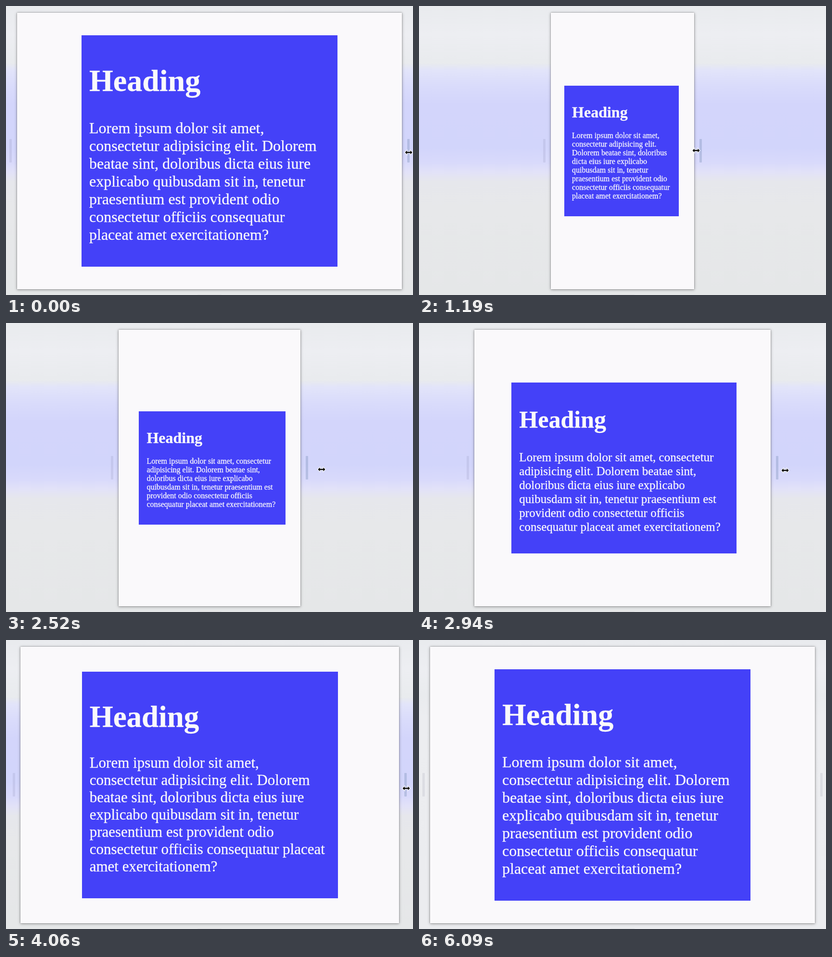
Recreate the animation shown at these times as an HTML page. Size 846x602 px, loop 6160 ms.

```html
<!DOCTYPE html>
<html lang="en">
<head>
<meta charset="utf-8">
<title>Responsive card</title>
<style>
  html, body { margin: 0; width: 100%; height: 100%; overflow: hidden; }
  #stage {
    position: relative; width: 846px; height: 602px; overflow: hidden;
    background: linear-gradient(#e9ebee 0, #edeef2 60px, #e9ebee 115px, #ecedf0 160px, #ebecef 602px);
  }
  #stage * { position: absolute; box-sizing: border-box; margin: 0; }
  #glow {
    left: 0; top: 120px; width: 846px; height: 482px;
    background: linear-gradient(#e8eaee 0, #e2e4fa 14px, #d9dbfb 48px, #d3d5fb 85px, #d2d5fb 175px,
      #d9dafb 207px, #e2e2f8 226px, #e6e7ec 246px, #e7e8ea 300px, #e5e7e8 482px);
  }
  #page { top: 14px; height: 576px; overflow: hidden; background: #faf9fb; }
  #shadow { top: 14px; height: 576px; box-shadow: 0 0 2px rgba(0,0,0,.4), 0 1px 6px rgba(0,0,0,.35); }
  .grip { top: 277px; width: 5px; height: 49px; border-radius: 1px; background: rgba(20,20,50,.07); }
  #right.hot { background: rgba(70,100,140,.22); }
  #foot { left: 398px; top: 601px; width: 50px; height: 1px; background: #dcdde0; }
  #card {
    padding: 16px; background: #4441f8; color: #faf9fb;
    font-family: "Liberation Serif", Times, "Times New Roman", serif;
    -webkit-text-stroke: .3px;
  }
  #stage #card > * { position: relative; top: -.6px; }
  #card::before, #card::after { content: ""; display: table; }
  #cursor { left: -10px; top: -8px; width: 20px; height: 16px; }
</style>
</head>
<body>
<div id="stage">
  <div id="glow"></div>
  <div id="foot"></div>
  <div id="left" class="grip"></div>
  <div id="right" class="grip"></div>
  <div id="shadow"></div>
  <div id="page">
    <div id="card">
      <h1>Heading</h1>
      <p>Lorem ipsum dolor sit amet, consectetur adipisicing elit. Dolorem beatae sint, doloribus dicta eius iure explicabo quibusdam sit in, tenetur praesentium est provident odio consectetur officiis consequatur placeat amet exercitationem?</p>
    </div>
  </div>
  <svg id="cursor" viewBox="-10 -8 20 16">
    <path d="M-7.5 0L-3.5-4V-1.2H3.5V-4L7.5 0L3.5 4V1.2H-3.5V4Z" stroke="#fff" stroke-width="2" paint-order="stroke"/>
  </svg>
</div>
<script>
  const LOOP = 6160, STEP = 70, MID = 423;
  const $ = id => document.getElementById(id);
  const [glow, left, right, shadow, page, card, cursor] =
    ['glow', 'left', 'right', 'shadow', 'page', 'card', 'cursor'].map($);
  const head = card.querySelector('h1'), text = card.querySelector('p');
  const clamp = (lo, v, hi) => Math.max(lo, Math.min(v, hi));
  const px = (el, styles) => {
    for (const key in styles) el.style[key] = styles[key] + 'px';
  };

  // time, value, slope
  const widths = [
    [0, 800, 0], [100, 800, 0], [700, 486, -.39], [1260, 282, -.2], [1820, 229, 0], [2125, 229, 0],
    [2940, 616, .36], [3500, 744, .1], [4060, 786.6, .04], [4480, 800, 0]
  ];
  const heights = [
    [0, 305, 0], [700, 299, 0], [2030, 304, 0], [2940, 307, .004], [3500, 309, 0], [4060, 309, 0]
  ];

  function curve(keys, t) {
    const i = keys.findIndex(k => k[0] > t);
    if (i < 0) return keys[keys.length - 1][1];
    const [t0, a, m] = keys[i - 1], [t1, b, n] = keys[i];
    const d = t1 - t0, u = (t - t0) / d, v = 1 - u;
    return v * v * (1 + 2 * u) * a + u * u * (3 - 2 * u) * b + d * u * v * (v * m - u * n);
  }

  // Whole-pixel glyph size with 15% extra ascent
  function setType(el, size, margin) {
    const f = Math.round(size);
    const em = Math.round(f * .75) + Math.round(f * .25);
    px(el, {
      fontSize: f,
      lineHeight: em + Math.floor(em * .15 + .5),
      marginTop: size * margin,
      marginBottom: size * margin
    });
  }

  function draw(t) {
    const outer = curve(widths, t);
    const w = Math.round(outer), x = Math.round(MID - outer / 2);
    px(page, { left: x, width: w });
    px(shadow, { left: x, width: w });
    px(left, { left: x - 16 });
    px(right, { left: x + w + 11 });

    // The content runs slightly ahead of the frame, the pointer more so
    const inner = curve(widths, t + 18);
    const size = Math.max(16, inner * .04);
    const cardWidth = clamp(200, inner * .7, 500) + 32;
    setType(head, size * 2, .67);
    setType(text, size, 1);
    px(card, { width: cardWidth, left: Math.max(0, (inner - cardWidth) / 2) });
    px(card, { top: 288 - card.getBoundingClientRect().height / 2 });

    const held = t < 4620;
    const cx = Math.round(MID + curve(widths, t + 95) / 2 + 14);
    const cy = Math.round(curve(heights, t));
    cursor.style.transform = `translate(${cx}px, ${cy}px)`;
    cursor.style.visibility = held ? 'visible' : 'hidden';
    right.classList.toggle('hot', held);
    glow.style.opacity = clamp(0, (5740 - t) / 560, 1);
  }

  const start = performance.now();
  let last = -1;
  function tick() {
    const time = Math.max(0, performance.now() - start) % LOOP;
    const t = Math.floor(time / STEP) * STEP;
    if (t !== last) draw(last = t);
    requestAnimationFrame(tick);
  }
  tick();
</script>
</body>
</html>
```
